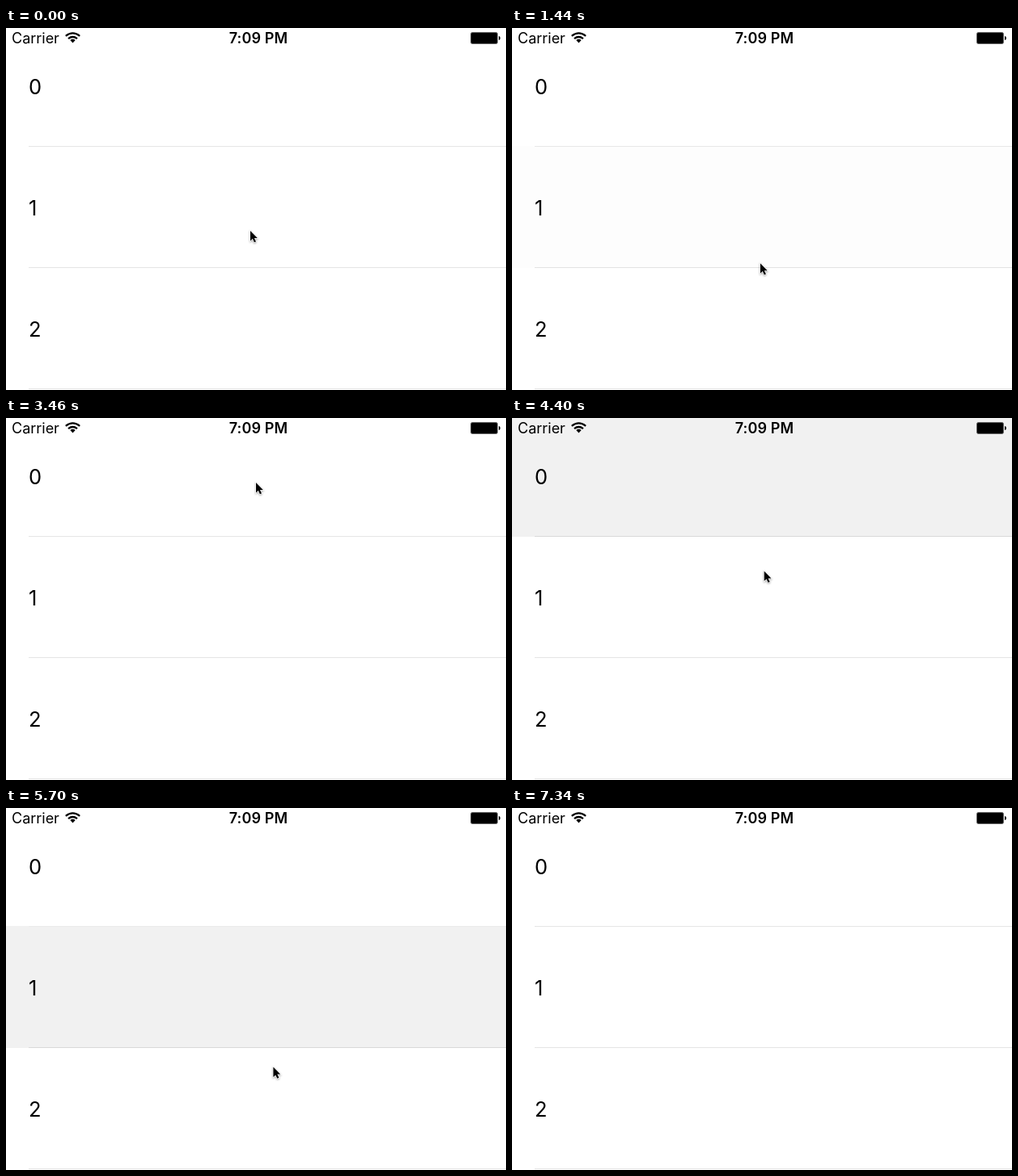
These frames come from a looping animation (618x448 px, 7880 ms). An HTML page:

```html
<!DOCTYPE html>
<html lang="en">
<head>
<meta charset="utf-8">
<title>Tapping table rows</title>
<style>
  html, body { margin: 0; width: 100%; height: 100%; overflow: hidden; background: #fff; }
  svg { display: block; font-family: Inter, Roboto, sans-serif; }
  .status { font-size: 18px; }
  .clock { font-weight: 600; text-anchor: middle; letter-spacing: .15px; }
  .label { font-size: 25.5px; }
  .line { fill: #000; fill-opacity: .1; }
  .arrow { filter: drop-shadow(0 1px .8px rgba(0, 0, 0, .35)); }
</style>
</head>
<body>
<svg width="618" height="448" viewBox="0 0 618 448">
  <g id="rows"></g>
  <text class="status" x="7" y="19.3">Carrier</text>
  <g fill="none" stroke="#000" stroke-width="2.2">
    <path d="M73.8 9.8Q82.5 2.8 91.2 9.8"/>
    <path d="M77 13.2Q82.5 8.8 88 13.2"/>
  </g>
  <path d="M79.3 15.1Q82.5 12.6 85.7 15.1L82.5 18.4Z"/>
  <text class="status clock" x="312" y="19.3">7:09 PM</text>
  <rect x="574.5" y="5.5" width="33" height="14" rx="2" stroke="#666"/>
  <path d="M609 10Q611 10.3 611 12.5T609 15Z"/>
  <g id="cursor">
    <path class="arrow" d="M0 1V13.4L2.8 10.8L4.9 15.2L7 14.2L4.9 10H8.8Z"
      stroke="#fff" stroke-width="1.4" paint-order="stroke"/>
    <circle id="ring" cy="1" r="22" fill="none" stroke="#222" stroke-width="2"/>
  </g>
</svg>
<script>
const LOOP = 7880, PRESS = 100, HOLD = 350, FADE = 730, PITCH = 150;

// The pointer glides to x, y between leave and arrive, then taps the row
const stops = [
  { x: 302, y: 250, leave: -2, arrive: -1, row: 1, press: 140, lit: 410 },
  { x: 313, y: 340, leave: 1060, arrive: 1880, row: 2, press: 1860, lit: 1960 },
  { x: 309, y: 79, leave: 2020, arrive: 3140, row: 0, press: 3360, lit: 3600 },
  { x: 312, y: 201, leave: 3600, arrive: 4600, row: 1, press: 4680, lit: 4900 },
  { x: 332, y: 330, leave: 4900, arrive: 5870, row: 2, press: 5960, lit: 6260 },
  { x: 640, y: 434, leave: 6740, arrive: 6920 }
];

const find = id => document.getElementById(id);
const rowsGroup = find('rows'), cursor = find('cursor'), ring = find('ring');
const clamp = k => Math.min(1, Math.max(0, k));
const smooth = k => k * k * (3 - 2 * k);

function add(tag, attrs, text = '') {
  const el = document.createElementNS('http://www.w3.org/2000/svg', tag);
  for (const name in attrs) el.setAttribute(name, attrs[name]);
  el.textContent = text;
  return rowsGroup.appendChild(el);
}

const rows = [0, 1, 2].map(i => {
  const base = i * PITCH, top = Math.max(0, base - 4);
  return {
    fill: add('rect', { y: top, width: 618, height: base + 147 - top, fill: '#d9d9d9' }),
    line: add('rect', { class: 'line', x: 28, y: base + 146, width: 590, height: 1 }),
    label: add('text', { class: 'label', x: 28, y: base + 81.7 }, String(i))
  };
});
rows.forEach(({ line }) => rowsGroup.append(line));

function pointerAt(t) {
  let x = 0, y = 0;
  for (const stop of stops) {
    const k = smooth(clamp((t - stop.leave) / (stop.arrive - stop.leave)));
    x += (stop.x - x) * k;
    y += (stop.y - y) * k;
  }
  return [x, y];
}

function shadeAt(row, t) {
  const tap = stops.filter(s => s.row === row && s.lit <= t).pop();
  return tap ? clamp(1 - (t - tap.lit - HOLD) / FADE) : 0;
}

function draw() {
  const t = performance.now() % LOOP;
  const shades = rows.map((_, i) => shadeAt(i, t));
  rows.forEach(({ fill, line }, i) => {
    const below = shades[i + 1] || 0;
    fill.setAttribute('opacity', shades[i]);
    line.setAttribute('opacity', shades[i] === 1 ? 0 : (1 - below) ** 3);
  });
  cursor.setAttribute('transform', `translate(${pointerAt(t)})`);
  ring.setAttribute('opacity', stops.some(s => t >= s.press && t < s.press + PRESS) ? 1 : 0);
  requestAnimationFrame(draw);
}
draw();
</script>
</body>
</html>
```
